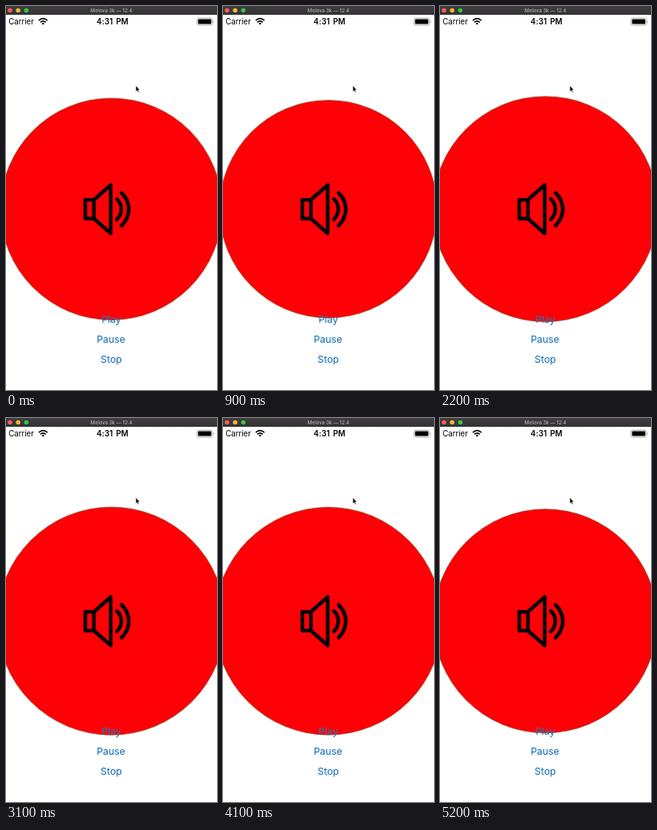
These frames come from a looping animation (264 px wide and 480 px high, 5300 ms). An HTML page:

```html
<!DOCTYPE html>
<html lang="en">
<head>
<meta charset="utf-8">
<style>
  html, body { margin: 0; width: 100%; height: 100%; overflow: hidden; background: #fff; }
  svg { display: block; width: 264px; height: 480px; font-family: Inter, sans-serif; }
  .buttons { font-size: 12.3px; fill: #0b69b4; text-anchor: middle; }
  .icon { fill: none; stroke: #000; stroke-width: 4.6; stroke-linecap: round; stroke-linejoin: round; }
</style>
</head>
<body>
<svg viewBox="0 0 264 480">
  <defs>
    <linearGradient id="bar" x2="0" y2="1">
      <stop stop-color="#403e40"/>
      <stop offset="1" stop-color="#343234"/>
    </linearGradient>
    <clipPath id="inside"><circle class="pulse" cx="131.8" cy="253.8" r="139"/></clipPath>
  </defs>

  <circle class="pulse" cx="131.8" cy="253.8" r="139" fill="#fe0006" stroke="#80603c" stroke-width=".7"/>

  <g class="icon">
    <path d="M110 242.3H99.2V265.8H110ZM110 242.3L131 223.8V284.3L110 265.8"/>
    <path d="M138.6 241.2Q144.2 246.5 144.2 254T138.6 266.8M144.6 233.5Q153.6 242.5 153.6 254T144.6 274.5"/>
  </g>

  <g class="buttons">
    <text x="131.7" y="396.3">Play</text>
    <text x="131.7" y="396.3" fill="#6a5a80" font-weight="500" clip-path="url(#inside)">Play</text>
    <text x="131.3" y="421">Pause</text>
    <text x="131.7" y="445.7">Stop</text>
  </g>

  <rect width="264" height="11" fill="url(#bar)"/>
  <circle cx="5" cy="5.5" r="2.8" fill="#fb5c56"/>
  <circle cx="15.2" cy="5.5" r="2.8" fill="#f5b832"/>
  <circle cx="25.4" cy="5.5" r="2.8" fill="#35c546"/>
  <text x="132" y="8" font-size="6.2" font-weight="500" fill="#b0aeb0" text-anchor="middle">Melova 3k — 12.4</text>

  <text x="3.2" y="23" font-size="9.7">Carrier</text>
  <g fill="none" stroke="#000" stroke-width="1.7">
    <path d="M41 18.1Q46.4 13.3 51.8 18.1M43 20.4Q46.4 17.4 49.8 20.4"/>
    <path d="M44.7 21.7Q46.4 20.2 48.1 21.7L46.4 23.5Z" fill="#000" stroke="none"/>
  </g>
  <text x="133.3" y="23" font-size="9.8" font-weight="600" word-spacing="1.3" letter-spacing=".1" text-anchor="middle">4:31 PM</text>
  <rect x="238.9" y="15.2" width="19.4" height="8.8" rx="2.2" fill="none" stroke="#999" stroke-width=".8"/>
  <rect x="240.3" y="16.6" width="16.6" height="6" rx="1"/>
  <path d="M259.4 18Q261.2 19.6 259.4 21.2Z" fill="#999"/>

  <path d="M162.5 99.5V107L164.1 105.5L165.2 108L166.3 107.5L165.2 105.1H167.3Z" stroke="#fff" stroke-width=".4"/>
</svg>
<script>
  const LOOP = 5300, STEP = 100;
  const BEAT = 0.985, BEAT_START = 0.5;
  const circles = document.querySelectorAll('.pulse');

  // Each beat snaps small, then springs out and settles.
  function radius(t) {
    const s = (t - BEAT_START + BEAT) % BEAT;
    return 140.5 - 18.5 * Math.exp(-3.5 * s) * Math.cos(15 * s);
  }

  function draw() {
    const ms = performance.now() % LOOP;
    const r = radius(Math.floor(ms / STEP) * STEP / 1000);
    circles.forEach(c => c.setAttribute('r', r.toFixed(2)));
    requestAnimationFrame(draw);
  }
  draw();
</script>
</body>
</html>
```
